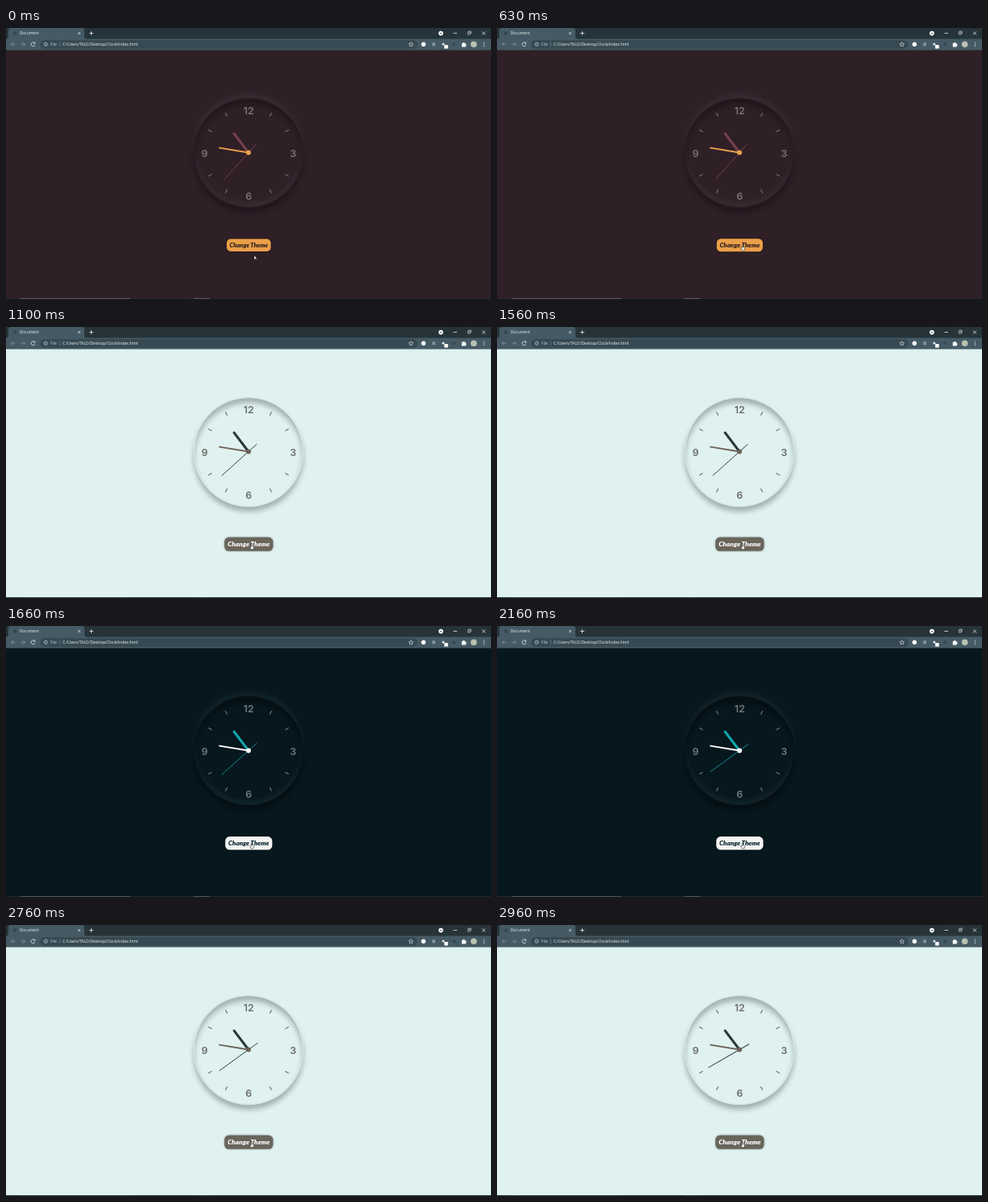
An HTML page that plays this animation: 600 px wide and 336 px high, repeating every 3000 ms.

```html
<!DOCTYPE html>
<html lang="en">
<head>
<meta charset="utf-8">
<title>Clock</title>
<style>
  html, body { margin: 0; width: 100%; height: 100%; overflow: hidden; }
  #stage { position: relative; width: 600px; height: 336px; overflow: hidden; background: var(--bg); }
  #dial {
    position: absolute; left: 231.8px; top: 86.6px; width: 136.4px; height: 136.4px;
    box-sizing: border-box; border: 1.5px solid var(--rim); border-radius: 50%;
    box-shadow: 0 -5.9px 5.9px rgba(255,255,255,.05), inset 0 -5.9px 5.9px rgba(255,255,255,.05),
                0 5.9px 5.9px rgba(0,0,0,var(--shade)), inset 0 5.9px 5.9px rgba(0,0,0,var(--shade));
  }
  svg { position: absolute; left: 0; top: 0; }
  .ui { font-family: "Open Sans", "Noto Sans", sans-serif; font-size: 4.9px; fill: #f1f4f5; }
  .line { fill: none; stroke: #e4eaec; stroke-width: .8; }
  #numbers { font: 600 12.4px Inter, "Open Sans", sans-serif; fill: var(--mark); text-anchor: middle; }
  #ticks { stroke: var(--mark); stroke-width: 1.1; }
  #hour { stroke: var(--hour); stroke-width: 3; stroke-linecap: round; }
  #minute { stroke: var(--accent); stroke-width: 1.9; stroke-linecap: round; }
  #second { stroke: var(--thin); stroke-width: .9; }
  #hub { fill: var(--accent); }
  #button { filter: drop-shadow(0 .7px 1.2px rgba(0,0,0,.45)); }
  #button rect { fill: var(--button); }
  #button text { font: italic 900 7.5px Lato, "Open Sans", sans-serif; fill: var(--label); text-anchor: middle; }
  #arrow, #hand { fill: #fff; stroke: #111; stroke-width: .5; stroke-linejoin: round; }
</style>
</head>
<body>
<div id="stage">
  <div id="dial"></div>
  <svg width="600" height="336" viewBox="0 0 600 336">
    <!-- browser window -->
    <rect width="600" height="14" fill="#26343a"/>
    <path d="M0 27.5V13.5Q3 13.5 3 11V3Q3 0 6 0H94Q97 0 97 3V11Q97 13.5 100 13.5H600V27.5Z" fill="#455a64"/>
    <rect x="42" y="15" width="467" height="10.8" rx="5.4" fill="#374a53"/>
    <circle cx="11" cy="6.6" r="2.3" fill="#354850"/>
    <g class="ui">
      <text x="16.8" y="8.2">Document</text>
      <text x="55" y="22" fill="#c5ced2">File</text>
      <text x="70" y="22">C:/Users/TALO/Desktop/Clock/index.html</text>
    </g>
    <g class="line">
      <path d="M89 5l3 3m0-3l-3 3M103 6.5h5m-2.5-2.5v5M553.5 6.5h4.5M589 4.5l4 4m0-4l-4 4"/>
      <path d="M571.3 5.2h2.8v2.8h-2.8zM572.3 5v-.9h2.9v2.9h-.9" stroke-width=".6"/>
      <path d="M11.5 20.2h-5m2.3-2.3l-2.3 2.3l2.3 2.3" stroke="#8999a1"/>
      <path d="M18.5 20.2h5m-2.3-2.3l2.3 2.3l-2.3 2.3" stroke="#8999a1"/>
      <path d="M35.2 18.5a2.4 2.4 0 1 0 .6 2.4M35.8 17.4v1.8h-1.8"/>
      <circle cx="49.2" cy="20.2" r="2.1" stroke-width=".6"/>
      <path d="M49.2 20v1.2M49.2 18.7v.5" stroke-width=".6"/>
      <path d="M66.5 17.2v6" stroke="#82929a" stroke-width=".5"/>
      <path d="M501 17.6l.8 1.8 2 .2-1.5 1.3.4 1.9-1.7-1-1.7 1 .4-1.9-1.5-1.3 2-.2z" stroke-width=".6"/>
    </g>
    <circle cx="538" cy="6.6" r="2.8" fill="#fff"/>
    <path d="M536.7 6h2.6l-1.3 1.6z" fill="#26343a"/>
    <circle cx="516.5" cy="20.3" r="2.7" fill="#fff"/>
    <rect x="527.5" y="18.2" width="3.4" height="4" fill="#8998a0"/>
    <circle cx="541" cy="20" r="1.6" fill="#dfe5e8"/>
    <rect x="542.2" y="21" width="4.6" height="4.6" rx=".6" fill="#fff"/>
    <circle cx="554.3" cy="20.2" r="2" fill="#35484f"/>
    <path d="M563.8 18.8h1.5a1 1 0 0 1 2 0h1.4v1.5a1 1 0 0 1 0 2v1.2h-4.9z" fill="#f5f7f8"/>
    <circle cx="578.7" cy="20.2" r="3.8" fill="#b9c2b0"/>
    <g fill="#f1f4f5"><circle cx="591.3" cy="18" r=".6"/><circle cx="591.3" cy="20.2" r=".6"/><circle cx="591.3" cy="22.4" r=".6"/></g>

    <!-- clock -->
    <g id="ticks"></g>
    <g id="numbers">
      <text x="300.2" y="106.6">12</text><text x="355.2" y="159.6">3</text>
      <text x="300.2" y="212.6">6</text><text x="245.6" y="159.6">9</text>
    </g>
    <g transform="translate(300 154.5)">
      <path id="hour" d="M0 0V-29.5" transform="rotate(322.7)"/>
      <path id="minute" d="M0 0V-36.3" transform="rotate(279.4)"/>
      <path id="second" d="M0 14V-44.6"/>
      <circle id="hub" r="3"/>
    </g>

    <g id="button">
      <rect x="-27.3" y="-7.7" width="54.6" height="15.4" rx="5"/>
      <text y="2.5">Change Theme</text>
    </g>
    <path id="arrow" d="M-1-3V2.1L.2 1 1.1 3 2 2.6 1.1.7H2.7Z"/>
    <path id="hand" d="M-.9-3.2Q-.3-3.7.1-3.2V-.9L2.2-.4Q2.7-.2 2.6.4L2 3.3H-.7L-2.4.9Q-2.4.1-1.7.3L-.9.9Z"/>

    <!-- taskbar edge -->
    <rect y="335" width="600" height="1" fill="#1e2b30"/>
    <path d="M18 335.5H154M232 335.5H252" stroke="var(--edge)"/>
  </svg>
</div>
<script>
  const LOOP = 3000;
  const maroon = { bg: '#2f1f27', rim: '#291a21', shade: .3, mark: '#7b7074', hour: '#75414c', thin: '#75414c',
                   accent: '#eba04a', button: '#eb9f48', label: '#2b1d22', edge: '#625c60', grow: 1.045 };
  const light = { bg: '#dff2f0', rim: '#d3e5e3', shade: .27, mark: '#6d6e6b', hour: '#293a3c', thin: '#2f3d3f',
                  accent: '#6e625a', button: '#6a655b', label: '#ffffff', edge: '#2b3a40', grow: 1.1 };
  const dark = { bg: '#06171e', rim: '#041218', shade: .35, mark: '#6f787b', hour: '#10a6ad', thin: '#128f96',
                 accent: '#ffffff', button: '#f3f4f2', label: '#06222b', edge: '#4c585d', grow: 1.065 };
  const schedule = [[0, maroon], [660, light], [1660, dark], [2760, light]];

  const $ = id => document.getElementById(id);
  const clamp = x => Math.min(1, Math.max(0, x));
  const ease = x => x * x * (3 - 2 * x);
  const mix = (a, b, k) => a + (b - a) * k;
  let current;

  for (let angle = 30; angle < 360; angle += 30) {
    if (angle % 90 === 0) continue;
    $('ticks').insertAdjacentHTML('beforeend',
      `<path d="M0-52.4V-57.4" transform="translate(300 155) rotate(${angle})"/>`);
  }

  function applyTheme(theme) {
    if (theme === current) return;
    current = theme;
    for (const key in theme) $('stage').style.setProperty('--' + key, theme[key]);
  }

  function draw(t) {
    const theme = schedule.filter(([start]) => t >= start).pop()[1];
    applyTheme(theme);

    const ticks = Math.floor((t + 140) / 1000);
    $('second').setAttribute('transform', `rotate(${222 + 6 * ticks})`);

    const move = ease(clamp((t - 30) / 400));
    const x = mix(308, 304, move), y = mix(285, 272.5, move);
    const hovering = y < 277.5;
    $('arrow').style.display = hovering ? 'none' : '';
    $('hand').style.display = hovering ? '' : 'none';
    for (const id of ['arrow', 'hand']) $(id).setAttribute('transform', `translate(${x} ${y})`);

    const scale = mix(1, theme.grow, ease(clamp((t - 260) / 200)));
    $('button').setAttribute('transform', `translate(300.3 269.3) scale(${scale})`);
  }

  const start = performance.now();
  function frame() {
    draw((performance.now() - start) % LOOP);
    requestAnimationFrame(frame);
  }
  frame();
</script>
</body>
</html>
```
